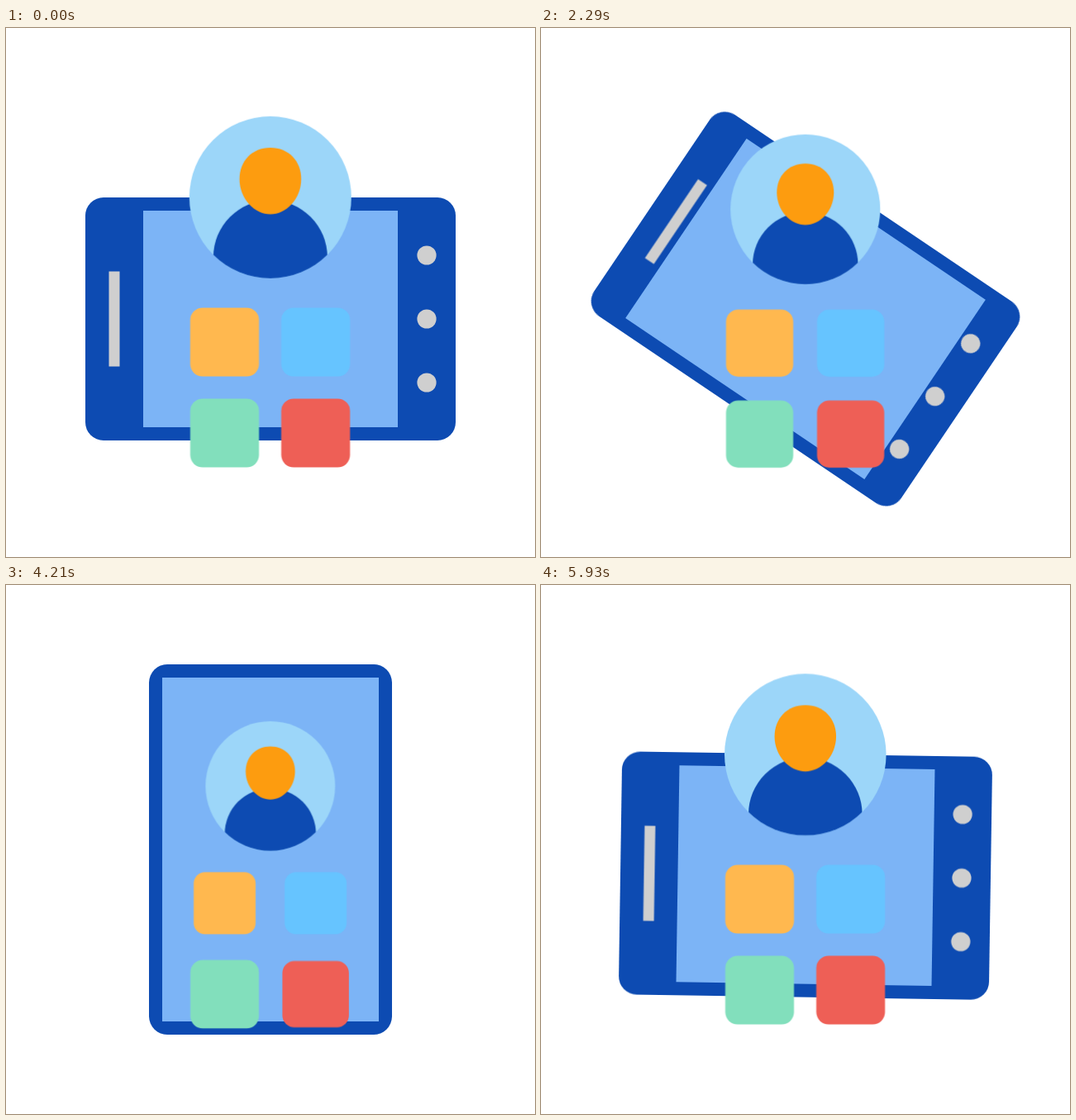
Animation, 640 px wide and 640 px high, one loop 6 s. Source, as an HTML page without scripts:

```html
<!DOCTYPE html>
<html lang="en">
<head>
<meta charset="utf-8">
<title>Rotating phone</title>
<style>
  html, body { margin: 0; width: 100%; height: 100%; overflow: hidden; background: #fff; }
  svg { display: block; width: 100vw; height: 100vh; }

  .morph, .settle, .bob, .pulse, .hover, .shrink {
    animation: 6s cubic-bezier(.33, 0, .67, 1) var(--lag, 0s) infinite;
  }
  .morph { animation-name: morph; animation-timing-function: cubic-bezier(.167, 0, .833, 1); }
  .settle { --to: translate(0, 5px) scale(.9); }
  .bob { animation-name: bob; }
  .bob.settle {
    animation-name: bob, settle;
    animation-delay: var(--lag, 0s), 0s;
    animation-timing-function: cubic-bezier(.33, 0, .67, 1), cubic-bezier(.167, 0, .833, 1);
  }
  .pulse { animation-name: pulse; }
  .hover { animation-name: hover; }
  .shrink { animation-name: shrink; }

  /* landscape to portrait and back */
  @keyframes morph {
    0%, 31.117%, 99.45%, 100% { transform: none; }
    48.883%, 81.667% { transform: var(--to); }
  }
  @keyframes settle {
    0%, 33.333%, 99.45%, 100% { transform: none; }
    51.117%, 81.667% { transform: var(--to); }
  }
  /* swing one way, then the other */
  @keyframes bob {
    0%, 1.117%, 31.117%, 100% { translate: 0 0; }
    11.117% { translate: var(--x, 0px) var(--y, 0px); }
    21.117% { translate: calc(var(--x, 0px) * -1) calc(var(--y, 0px) * -1); }
  }
  @keyframes hover {
    0%, 31.117%, 100% { translate: 0 0; }
    19% { translate: 0 -3.8px; }
  }
  @keyframes shrink {
    0%, 1.117%, 27.5%, 100% { transform: none; }
    14.3% { transform: translate(0, 1.5px) scale(1, .8); }
  }
  @keyframes pulse {
    0%, 54.45%, 67.8%, 100% { scale: 1; }
    57.8%, 61.1% { scale: .906; }
    64.3% { scale: 1.12; }
  }

  .swing { --y: 13px; }
  .mid { --lag: 80ms; }
  .late { --lag: 150ms; }
</style>
</head>
<body>
<svg viewBox="0 0 640 640">
  <defs>
    <clipPath id="disc"><circle r="98"/></clipPath>
  </defs>

  <g transform="translate(320 352)">
    <g class="hover">
      <g class="morph" style="--to: translate(0, -32px) rotate(90deg)">
        <rect x="-224" y="-147" width="448" height="294" rx="22" fill="#0d4bb2"/>
        <g fill="#cfcfcf">
          <rect class="shrink" x="-195.5" y="-57.5" width="13" height="115"/>
          <circle class="bob swing late" cx="189" cy="-77" r="11.6"/>
          <circle class="bob swing mid" cx="189" r="11.6"/>
          <circle class="bob swing" cx="189" cy="77" r="11.6"/>
        </g>
        <rect class="morph" style="--to: scale(1.3506, 1)" x="-154" y="-131" width="308" height="262" fill="#7cb4f6"/>
      </g>
    </g>
  </g>

  <g transform="translate(319.8 204.8)">
    <g class="bob swing">
      <g class="morph" style="--to: translate(0, 38.4px) scale(.8)">
        <circle r="98" fill="#9cd6f9"/>
        <g clip-path="url(#disc)">
          <path class="bob" style="--x: -4.6px; --y: 0px" fill="#0d4bb2"
                d="M-69 110V72.5a69 69 0 0 1 138 0V110z"/>
        </g>
        <path class="bob" style="--x: 1.8px; --y: .6px" fill="#fd9c0f"
              d="M0-60C22-60 37.3-44 37.3-22C37.3 2 19 20.5 0 20.5S-37.3 2-37.3-22C-37.3-44-22-60 0-60z"/>
      </g>
    </g>
  </g>

  <g transform="translate(264.5 380)">
    <g class="bob settle swing late">
      <rect class="pulse" style="--lag: 0s" x="-41.6" y="-41.6" width="83.2" height="83.2" rx="15" fill="#ffb84f"/>
    </g>
  </g>
  <g transform="translate(374.6 380)">
    <g class="bob settle swing late">
      <rect class="pulse" style="--lag: .1s" x="-41.6" y="-41.6" width="83.2" height="83.2" rx="15" fill="#66c4ff"/>
    </g>
  </g>
  <g transform="translate(264.5 490)">
    <g class="bob settle swing mid">
      <rect class="pulse" style="--lag: .31s" x="-41.6" y="-41.6" width="83.2" height="83.2" rx="15" fill="#82dfbc"/>
    </g>
  </g>
  <g transform="translate(374.6 490)">
    <g class="bob settle swing mid">
      <rect class="pulse" style="--lag: .41s" x="-41.6" y="-41.6" width="83.2" height="83.2" rx="15" fill="#ee5f56"/>
    </g>
  </g>
</svg>
</body>
</html>
```
